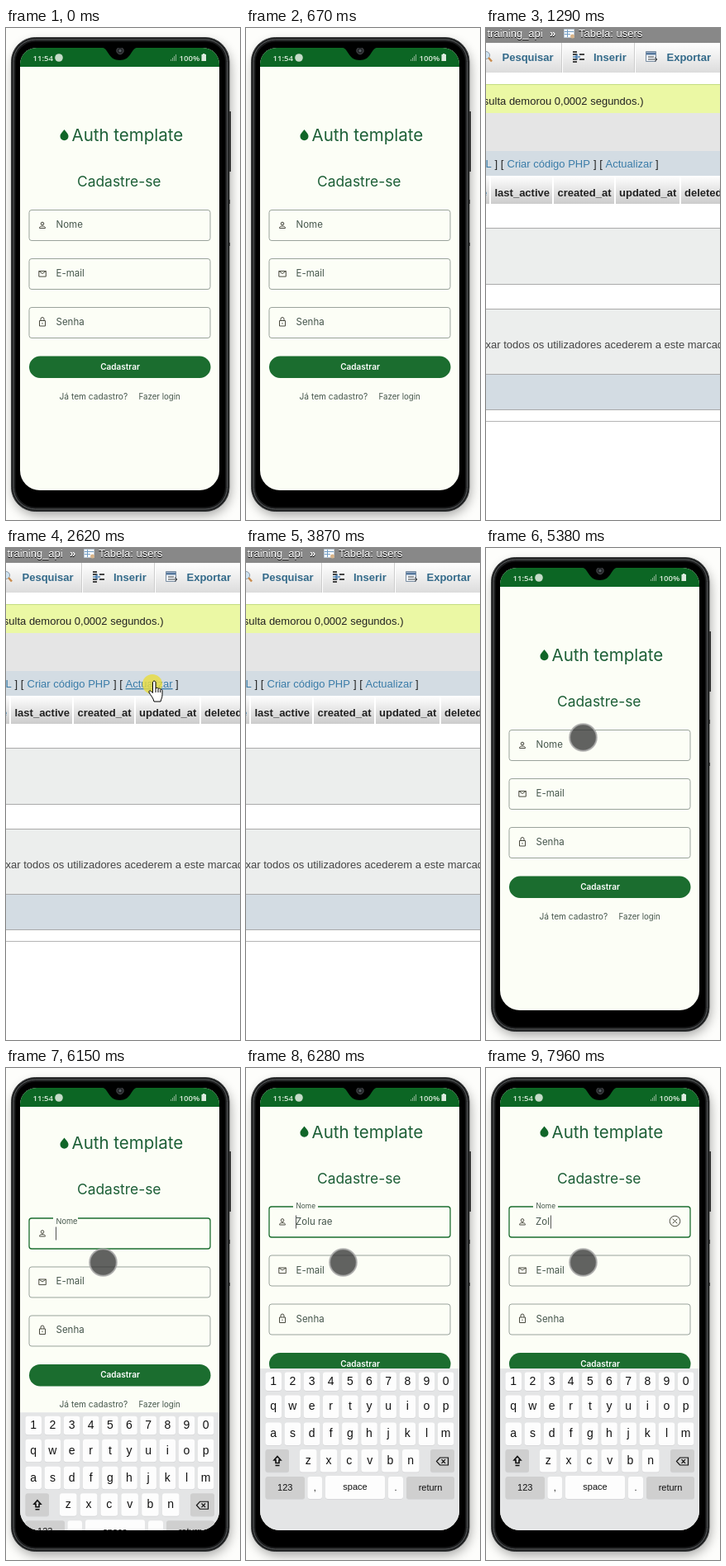
An HTML page for the animation above (8000 ms loop, 283x596 px).

```html
<!DOCTYPE html>
<html lang="pt">
<head>
<meta charset="utf-8">
<title>Auth template</title>
<style>
  html, body { margin: 0; width: 100%; height: 100%; overflow: hidden; background: #fff; }
  svg { display: block; width: 100%; height: 100%; }
  .app { font-family: Inter, sans-serif; fill: #45564c; }
  .status { font: 600 9.6px "Open Sans", sans-serif; fill: #dcebdd; }
  .db { font: 13px "Liberation Sans", Arial, sans-serif; fill: #222; }
  .keys { font: 14px "Liberation Sans", Arial, sans-serif; fill: #111; text-anchor: middle; }
  .bold { font-weight: 700; }
  .link { fill: #3a7ca8; }
  .tab { fill: #336a8a; }
  .green { fill: #1d5f37; }
  .box { fill: none; stroke: #9aa39c; }
  .icon { fill: none; stroke: #4a4a40; stroke-width: 1; }
</style>
</head>
<body>
<svg viewBox="0 0 283 596" preserveAspectRatio="none">
  <defs>
    <linearGradient id="tabs" x2="0" y2="1"><stop stop-color="#fff"/><stop offset="1" stop-color="#dcdcdc"/></linearGradient>
    <linearGradient id="head" x2="0" y2="1"><stop stop-color="#fff"/><stop offset="1" stop-color="#ccc"/></linearGradient>
    <clipPath id="screen"><path d="M17 44a20 20 0 0 1 20-20h201a20 20 0 0 1 20 20v492a24 24 0 0 1-24 24h-193a24 24 0 0 1-24-24z"/></clipPath>
    <filter id="soft" x="-20%" width="140%" y="-10%" height="120%"><feGaussianBlur stdDeviation="7"/></filter>
  </defs>

  <g id="phone">
    <rect width="283" height="596" fill="#fdfdfb"/>
    <rect x="9" y="18" width="262" height="572" rx="30" opacity=".36" filter="url(#soft)"/>
    <path d="M269 101h3v73h-3zM268 208h3v5h-3zM268 260h3v4h-3z" fill="#2b2b2b"/>
    <rect x="6.500" y="11.500" width="263.500" height="574" rx="29" fill="#1b1c1d" stroke="#3c3e3f"/>
    <rect x="9" y="14" width="258.500" height="569" rx="26.500" fill="none" stroke="#5c5f61"/>
    <rect x="11.500" y="16.500" width="253.500" height="564" rx="24"/>
    <g clip-path="url(#screen)">
      <rect x="17" y="24" width="241" height="536" fill="#fcfef6"/>
      <g class="app" id="form">
        <path d="M70.5 123c2 3 5 5 5 8.300a5 5 0 0 1-10 0c0-3.300 3-5.300 5-8.300z" fill="#116629"/>
        <text class="green" x="79.500" y="137" font-size="20.500">Auth template</text>
        <text class="green" x="86" y="192" font-size="17.400">Cadastre-se</text>
        <rect id="nameBox" class="box" x="28" y="220.500" width="219" height="37" rx="3"/>
        <rect class="box" x="28" y="279.500" width="219" height="37" rx="3"/>
        <rect class="box" x="28" y="338.500" width="219" height="37" rx="3"/>
        <g class="icon">
          <circle cx="44" cy="237" r="1.800"/><path d="M40.500 242.500v-.5c0-2.600 7-2.600 7 0v.5z"/>
          <path d="M39.800 294.500h8.500v6.600h-8.500zl4.250 3 4.250-3"/>
          <path d="M40.500 354.500h7v6.500h-7zM42 354.500v-2a2 2 0 0 1 4 0v2M44 357v1.600"/>
        </g>
        <rect id="gap" x="57" y="218" width="30" height="5" fill="#fcfef6"/>
        <text id="nameLabel" x="60.500">Nome</text>
        <text x="60.500" y="301" font-size="11.500">E-mail</text>
        <text x="60.500" y="360" font-size="11.500">Senha</text>
        <text id="value" x="60" y="242" font-size="11.500"></text>
        <path id="caret" d="M0 231v16" stroke="#555"/>
        <g id="clear" class="icon">
          <circle cx="228.500" cy="238" r="6.300"/><path d="M225.700 235.200l5.600 5.600m0-5.600l-5.600 5.600"/>
        </g>
        <rect x="28" y="397.500" width="219.500" height="26.500" rx="13.250" fill="#1b6d2f"/>
        <text x="138" y="414" font-size="10" font-weight="600" text-anchor="middle" style="fill:#fff">Cadastrar</text>
        <text x="64.500" y="450" font-size="10.200">Já tem cadastro?</text>
        <text x="160.500" y="450" font-size="9.700">Fazer login</text>
      </g>
      <g class="keys" id="keyboard"><rect x="17" y="364" width="241" height="200" fill="#e4e5e6"/></g>
      <rect x="17" y="24" width="241" height="23" fill="#0c6624"/>
      <path d="M113 23c8 1 8 4 11 8 3 5 7 8 13.500 8s10.500-3 13.500-8c3-4 3-7 11-8z"/>
      <circle cx="138" cy="27.500" r="4.200" fill="#25272a" stroke="#4a4d50"/><circle cx="138" cy="27.500" r="1.500" fill="#596066"/>
      <g class="status">
        <text x="32.500" y="39.500">11:54</text><text x="209.500" y="39.500">100%</text>
        <circle cx="64" cy="36" r="4.800" fill="#c5dbc8"/>
        <path d="M199.500 40v-2m2 2v-4m2 4v-6m2 6v-8" stroke="#89b190" fill="none"/>
        <path d="M236.500 32h1.500v-1h2.500v1h1.500v8h-5.500z"/>
      </g>
    </g>
    <circle id="touch" r="16.300" fill="#333" fill-opacity=".77" stroke="#aaa" stroke-opacity=".85" stroke-width="2"/>
  </g>

  <g id="database" class="db">
    <rect width="283" height="596" fill="#fff"/>
    <rect width="283" height="18" fill="#888"/>
    <g style="fill:#fff;text-shadow:0 1px 0 #000">
      <text x="1.500" y="11">training_api</text><text class="bold" x="77" y="11">»</text><text x="112" y="11">Tabela: users</text>
    </g>
    <path d="M94.500 1.500h12v10h-12z" fill="#fff" stroke="#bbc8d4"/>
    <path d="M95 4.500h11M95 7.500h7M98.500 2v9" stroke="#6e9bc4"/><circle cx="104.500" cy="10" r="2.500" fill="#d8b48a"/>
    <rect y="18" width="283" height="36" fill="url(#tabs)"/>
    <path d="M91.500 18v36M179.500 18v36" stroke="#ccc"/><path d="M92.500 18v36M180.500 18v36" stroke="#fff"/>
    <g class="bold">
      <text class="tab" x="19.500" y="40">Pesquisar</text><text class="tab" x="130" y="40">Inserir</text><text class="tab" x="218.500" y="40">Exportar</text>
    </g>
    <circle cx="0" cy="33" r="4.500" fill="#cfe3f1" stroke="#8a9aa8"/><path d="M3 36l4 4.500" stroke="#c98a4b" stroke-width="2.500"/>
    <path d="M105 29h5m-5 3h5m-5 6h5m-5 3h5M113 32h6m-6 6h6" stroke="#444" stroke-width="2"/>
    <path d="M105 35h9m-3-3l-3 3 3 3" stroke="#4d83b5" stroke-width="1.500" fill="none"/>
    <path d="M193.500 28.500h12v12h-12z" fill="#eef3f8" stroke="#778ba0"/><path d="M194 31h11" stroke="#55779d" stroke-width="3"/>
    <path d="M196 35h7m-7 3h11m-3-2.500l3 2.500-3 2.500" stroke="#444" fill="none"/>
    <rect y="69" width="283" height="34" fill="#ebf8a4"/><path d="M0 68.500h283" stroke="#c4de80"/>
    <text x="190.500" y="93" text-anchor="end">consulta demorou 0,0002 segundos.)</text>
    <rect y="103" width="283" height="46" fill="#e5e5e5"/>
    <rect y="149" width="283" height="30" fill="#d3dce3"/>
    <text class="link" x="-.500" y="169">L</text><text x="10.500" y="169">] [</text>
    <text class="link" x="25.500" y="169">Criar código PHP</text><text x="130" y="169">] [</text>
    <text class="link" id="refresh" x="144.500" y="169">Actualizar</text><text x="205" y="169">]</text>
    <rect y="179" width="283" height="34" fill="url(#head)"/>
    <path d="M5 179v34M81 179v34M156 179v34M235 179v34" stroke="#fff" stroke-width="2"/>
    <g class="bold">
      <text class="link" x="-6" y="204">e</text><text x="10.500" y="204">last_active</text><text x="86.500" y="204">created_at</text>
      <text x="161" y="204">updated_at</text><text x="240" y="204">deleted_at</text>
    </g>
    <g fill="#eceeed" stroke="#aaa"><path d="M-2 242.500h287v68h-287zM-2 340.500h287v79h-287z"/><path d="M-2 419.500h287v43h-287z" fill="#d3dce3"/></g>
    <path d="M0 476.500h283" stroke="#b5b5b5"/>
    <text x="-.500" y="388" style="fill:#444">xar todos os utilizadores acederem a este marcador</text>
    <g id="pointer">
      <circle r="12" fill="#e8dc3c" fill-opacity=".8"/>
      <path id="arrow" d="M0 0v16l4-3.500 2.500 6 2.500-1-2.500-6h5z" fill="#fff" stroke="#000"/>
      <path id="hand" d="M.5-2c0-2.500 3.500-2.500 3.500 0v7c1-1 3-.8 3 .5 1-.8 2.500-.4 2.700.8 1-.5 2.300.1 2.300 1.500v5c0 4-1.500 5-2 8.200H2C1.500 17-2.500 13-4 10c-.8-2 1.500-3 3-1l1.500 1.500zM4 5v5m3-4v4m2.700-3v3" fill="#fff" stroke="#000"/>
    </g>
  </g>
</svg>
<script>
const LOOP = 8000;
const $ = id => document.getElementById(id);
const show = (id, on) => $(id).setAttribute('visibility', on ? 'inherit' : 'hidden');
const within = (t, from, to) => t >= from && t < to;
const easeOut = p => 1 - (1 - p) ** 2;
const smooth = p => p * p * (3 - 2 * p);
const progress = (t, from, to) => Math.min(1, Math.max(0, (t - from) / (to - from)));
const mix = (a, b, p) => a + (b - a) * p;
const place = (id, x, y) => $(id).setAttribute('transform', `translate(${x} ${y})`);

function add(parent, tag, attrs, text = '') {
  const node = document.createElementNS('http://www.w3.org/2000/svg', tag);
  for (const name in attrs) node.setAttribute(name, attrs[name]);
  node.textContent = text;
  $(parent).append(node);
}

function addKey(label, x, y, w, h, dark, size = 14) {
  add('keyboard', 'rect', { x, y: y + .7, width: w, height: h, rx: 3, fill: '#d3d4d6' });
  add('keyboard', 'rect', { x, y, width: w, height: h, rx: 3, fill: dark ? '#cfcfcf' : '#fdfdfd' });
  add('keyboard', 'text', { x: x + w / 2, y: y + h / 2 + size * .3, 'font-size': size }, label);
}

const addRow = (letters, x, y, step, w, h) =>
  [...letters].forEach((c, i) => addKey(c, x + i * step, y, w, h));

addRow('1234567890', 23.5, 368.5, 23.15, 19.5, 22.5);
addRow('qwertyuiop', 23.5, 396.5, 23.15, 19.5, 27.5);
addRow('asdfghjklm', 23.5, 429.5, 23.15, 19.5, 27.5);
addRow('zxcvbn', 65, 462, 24.8, 20.5, 27.5);
addKey('', 23.5, 462, 28.5, 27.5, true);
addKey('', 223, 462, 29, 27.5, true);
addKey('123', 23.5, 495, 47.5, 27, true, 11);
addKey(',', 74.5, 495, 17.5, 27, false, 11);
addKey('space', 96, 494, 72, 28, false, 11);
addKey('.', 172, 495, 18, 27, false, 11);
addKey('return', 194, 495, 58, 27, true, 11);
const outline = { fill: 'none', stroke: '#111', 'stroke-width': 1.2 };
add('keyboard', 'path', { ...outline, 'stroke-width': 1.6, d: 'M38 470.500l4 4.500h-2v3.500h-4v-3.500h-2zM35.500 481.500h5' });
add('keyboard', 'path', { ...outline, d: 'M230.500 476.500l4-4.500h10v9h-10zM236.500 474.200l4.600 4.600m0-4.600l-4.600 4.600' });

function drawTouch(t) {
  show('touch', within(t, 210, 670) || t >= 4680);
  if (t < 670) {
    const p = progress(t, 210, 670);
    place('touch', mix(204, 97, p), mix(337, -17, p));
  } else {
    const p = easeOut(progress(t, 4680, 5380));
    place('touch', mix(52, 117.5, p), mix(68, 229.5, p) + 6 * progress(t, 5630, 5830));
  }
}

function drawForm(t) {
  const open = easeOut(progress(t, 6030, 6280));
  const focused = t >= 6030;
  place('form', 0, -52.5 * open);
  place('keyboard', 0, 200 * (1 - open));
  show('keyboard', focused);
  show('gap', open > .5);

  const box = $('nameBox');
  box.style.stroke = focused ? '#1b6d2f' : '';
  box.style.strokeWidth = focused ? 1.3 : '';
  $('nameLabel').setAttribute('y', mix(242, 222.5, open));
  $('nameLabel').setAttribute('font-size', mix(11.5, 8.4, open));

  const typed = 'Zol'.slice(0, t < 7720 ? 0 : t < 7840 ? 1 : t < 7960 ? 2 : 3);
  $('value').textContent = typed || (open > .8 ? 'Zolu rae' : '');
  place('caret', typed ? 61.5 + $('value').getComputedTextLength() : 60.5, 0);
  show('caret', within(t, 6070, 6600) || within(t, 7140, 7650) || typed);
  show('clear', typed);
}

function drawPointer(t) {
  const hovering = within(t, 2410, 3620);
  const visible = within(t, 1730, 3870);
  show('pointer', visible);
  show('hand', visible && hovering);
  show('arrow', visible && !hovering);
  $('refresh').style.textDecoration = hovering ? 'underline' : '';
  const enter = smooth(progress(t, 1730, 2480));
  const leave = progress(t, 3560, 3870);
  place('pointer', mix(mix(124, 177, enter), 114, leave), mix(mix(19, 165, enter), 91, leave));
}

function frame() {
  const t = performance.now() % LOOP;
  const inDatabase = within(t, 1290, 4430);
  $('phone').style.display = inDatabase ? 'none' : '';
  $('database').style.display = inDatabase ? '' : 'none';
  if (inDatabase) drawPointer(t);
  else {
    drawTouch(t);
    drawForm(t);
  }
  requestAnimationFrame(frame);
}
frame();
</script>
</body>
</html>
```
